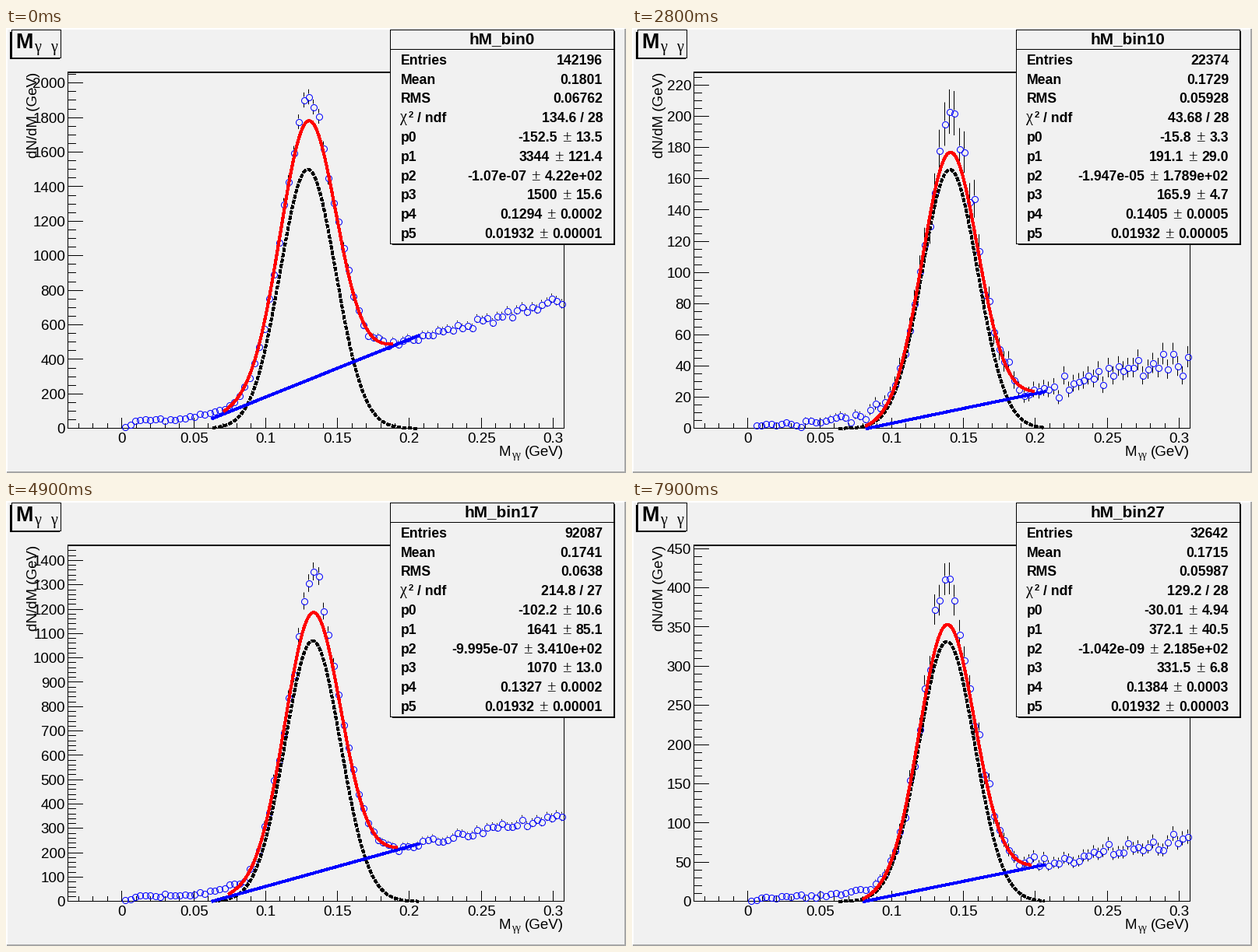
Write a matplotlib script that moves like this. It is 796 px wide and 572 px high and loops after 8000 ms.

```python
import numpy as np
import matplotlib.pyplot as plt
from matplotlib.animation import FuncAnimation
from matplotlib.collections import LineCollection
from matplotlib.patches import Rectangle

W, H, DPI = 796, 572, 100
PX = 72 / DPI
LEFT, RIGHT, TOP, BOTTOM = 79.6, 716.4, 57.2, 514.8
X_MIN, X_MAX = -0.0375, 0.3075
SIGMA = 0.01932
BG = "#f1f1f1"

# Key plots; the ones between are interpolated. p0 and p2 lack their minus sign,
# peak is the highest count and tail the level at x = 0.3.
COLUMNS = "plot entries mean rms chi2 ndf p0 p1 p2 p3 p4 peak tail".split()
KEYS = np.array([
    [0, 142196, .1801, .06762, 134.6, 28, 152.5, 3344, 1.07e-7, 1500, .1294, 1919, 735],
    [6, 116953, .1889, .06922, 110.8, 27, 94.44, 1717, 2.632e-6, 623.5, .13, 840, 450],
    [10, 22374, .1729, .05928, 43.68, 28, 15.8, 191.1, 1.947e-5, 165.9, .1405, 203, 42],
    [14, 63391, .1797, .06425, 116.3, 28, 48.04, 773.6, 1.115e-6, 475.7, .1362, 620, 190],
    [19, 118116, .1703, .0635, 323, 27, 168.5, 2708, 9.225e-7, 1837, .1304, 2281, 515],
    [23, 16626, .1855, .0649, 41.83, 26, 10.21, 79.72, 3.318e-7, 47.21, .1468, 67, 20],
    [27, 32642, .1715, .05987, 129.2, 28, 30.01, 372.1, 1.042e-9, 331.5, .1384, 412, 78],
])
BIN_X = X_MIN + (X_MAX - X_MIN) * (np.arange(100) + 0.5) / 100


def fit_at(k):
    plots = KEYS[:, 0]
    return {name: np.expm1(np.interp(k, plots, np.log1p(col)))
            for name, col in zip(COLUMNS, KEYS.T)}


def background(x, fit):
    return -fit["p0"] + fit["p1"] * x - fit["p2"] * x**2


def bell(x, center, width):
    return np.exp(-0.5 * ((x - center) / width) ** 2)


def gauss(x, fit):
    return fit["p3"] * bell(x, fit["p4"], SIGMA)


def total(x, fit):
    return background(x, fit) + gauss(x, fit)


def histogram(k, fit):
    x, peak, tail = BIN_X, fit["peak"], fit["tail"]
    model = total(x, fit)
    boost = peak / model[x < 0.2].max() - 1
    core = model * (1 + boost * bell(x, fit["p4"], 0.006))
    low = 0.075 * tail * np.clip(x / 0.012, 0, 1) * (1 + (x / 0.068) ** 4)
    high = np.interp(x, [0.195, 0.3, 0.31], [total(0.195, fit), tail, tail])
    mean = np.where(x < fit["p4"], np.maximum(low, core),
                    np.where(x < 0.195, core, high))
    mean = np.maximum(mean, 0)
    noise = np.random.default_rng(100 + k).normal(0, 0.6, 100)
    counts = np.round(np.clip(mean + noise * np.sqrt(mean), 0, peak))
    counts[np.argmax(mean)] = round(peak)
    return np.where(x > 0, counts, 0)


def fit_errors(fit):
    p3 = fit["p3"]
    return [0.6 * fit["p0"]**0.62, 2.1 * fit["p1"]**0.5, 37 * fit["p1"]**0.3,
            0.288 * p3**0.546, 0.0053 * p3**-0.47, 0.00234 * p3**-0.75]


def to_px(x):
    return LEFT + (x - X_MIN) / (X_MAX - X_MIN) * (RIGHT - LEFT)


def pixel(v):
    return np.floor(v) + 0.5


def tick_step(top):
    power = 10 ** np.floor(np.log10(top / 10))
    lead = top / 10 / power
    digit = 1 if lead <= 1.5 else 2 if lead <= 3 else 5 if lead <= 6 else 10
    return digit * power, 4 if digit == 2 else 5


def value_and_error(value, error):
    text = f"{value:.4g}"
    mantissa, exp, _ = text.partition("e")
    places = len(mantissa.partition(".")[2])
    return text, f"{error:.{places}e}" if exp else f"{error:.{places or 1}f}"


fig = plt.figure(figsize=(W / DPI, H / DPI), dpi=DPI, facecolor=BG)
ax = fig.add_axes([0, 0, 1, 1])
ax.set(xlim=(0, W), ylim=(H, 0))
ax.axis("off")


def put(x, y, text="", size=18.8, bold=False, family="Liberation Sans", **kw):
    return ax.text(x, y, text, fontsize=size * PX, family=family, zorder=9,
                   weight="bold" if bold else "normal", **kw)


def box(x0, y0, x1, y1, color, z=1):
    ax.add_patch(Rectangle((x0, y0), x1 - x0, y1 - y0, fc=color, lw=0,
                           antialiased=False, zorder=z))


def pave(x0, y0, x1, y1):
    box(x0, y0, x1, y1, "k", 7)
    box(x0 + 1, y0 + 1, x1 - 1, y1 - 1, BG, 8)


def line(color, width, z, **kw):
    return ax.plot([], [], color=color, lw=width * PX, zorder=z,
                   antialiased=False, **kw)[0]


def segments():
    lines = LineCollection([], colors="k", linewidths=PX, zorder=2)
    lines.set_snap(False)
    return ax.add_collection(lines)


# Canvas bevel and plot frame
box(0, 0, W, 2, "white")
box(0, 0, 2, H, "white")
box(W - 2, 1, W, H, "#a6a6a6")
box(1, H - 2, W, H, "#a6a6a6")
box(79, 56, 717, 58, "k")
box(79, 57, 80, 515, "k")
box(716, 57, 717, 515, "k")
box(79, 514, 717, 515, "k")

# Title
box(5, 5, 69, 40, "k", 6)
pave(7, 2, 71, 39)
put(12, 26, "M", 27, True)
for x in (36, 57):
    put(x, 30, "γ", 20, family="Liberation Serif")

# Axis titles and the fixed x axis
put(35.5, 57, "dN/dM (GeV)", rotation=90, ha="center", va="top")
put(633, 550, "M")
put(649.5, 553, "γγ", 13.5, family="Liberation Serif")
put(716, 550, "(GeV)", ha="right")
x_ticks = []
for n in range(-3, 31):
    x = pixel(to_px(n / 100))
    x_ticks.append([(x, 515), (x, 501 if n % 5 == 0 else 508)])
    if n >= 0 and n % 5 == 0:
        put(x, 533, f"{n / 100:g}", ha="center")
segments().set_segments(x_ticks)

# Statistics box
box(496, 4, 782, 279, "k", 6)
pave(493, 2, 781, 278)
box(494, 27, 780, 28, "k", 8)
STAT = 17.6
heading = put(636.5, 20.5, size=20.8, bold=True, ha="center")
rows = [47 + 24.75 * n for n in range(10)]
for y, name in zip(rows, ["Entries", "Mean", "RMS", "", *(f"p{n}" for n in range(6))]):
    put(506.5, y, name, STAT, True)
put(506.5, rows[3] - 1, "χ", 20, family="Liberation Serif")
put(517, rows[3] - 6, "2", 11.5, True)
put(528.5, rows[3], "/ ndf", STAT, True)
stats = [put(766, y, size=STAT, bold=True, ha="right") for y in rows]


def chain(text, right, y, gap, size, **kw):
    return ax.annotate(text, (0, y), (-gap, 0), xycoords=(right, "data"),
                       textcoords="offset pixels", ha="right", va="baseline",
                       fontsize=size * PX, zorder=9, **kw)


values = []
for y, error in zip(rows[4:], stats[4:]):
    sign = chain("±", error, y, 6, 21, family="Liberation Serif")
    values.append(chain("", sign, y, 6, STAT, family="Liberation Sans", weight="bold"))

# Moving parts
y_ticks, bars = segments(), segments()
y_labels = [put(76, 0, ha="right") for _ in range(18)]
points = line("blue", 1, 3, ls="none", marker="o", ms=8 * PX, mfc="none", mew=PX)
dashed = line("k", 3.3, 4, ls=(0, (1.3, 0.9)))
straight = line("blue", 3, 4)
curve = line("red", 3, 5)


def draw(frame):
    k = (frame + 2) // 3
    fit = fit_at(k)
    counts = histogram(k, fit)
    top = 1.05 * (counts + np.sqrt(counts)).max()

    def y_px(v):
        return BOTTOM - v / top * (BOTTOM - TOP)

    step, parts = tick_step(top)
    ticks = []
    for n in range(int(top / step * parts) + 1):
        y = pixel(y_px(n * step / parts))
        ticks.append([(79, y), (99 if n % parts == 0 else 90, y)])
    y_ticks.set_segments(ticks)
    for n, label in enumerate(y_labels):
        shown = n * step <= top
        label.set_text(f"{n * step:.0f}" if shown else "")
        label.set_y(y_px(n * step) + 6.6 if shown else 0)

    used = counts > 0
    xs, ns = pixel(to_px(BIN_X[used])), counts[used]
    ys, err = pixel(y_px(ns)), np.sqrt(ns) / top * (BOTTOM - TOP)
    points.set_data(xs, ys)
    bars.set_segments([[(x, y + s * 4), (x, y + s * e)]
                       for x, y, e in zip(xs, ys, err) if e > 4 for s in (-1, 1)])

    lo, hi = 0.0632, 0.2062
    wide = np.linspace(lo, hi, 300)
    near = np.linspace(max(lo, fit["p4"] - 3 * SIGMA),
                       min(hi, fit["p4"] + 3 * SIGMA), 300)
    for artist, func, x in ((dashed, gauss, wide), (straight, background, wide),
                            (curve, total, near)):
        v = func(x, fit)
        artist.set_data(to_px(x), y_px(np.where(v < 0, np.nan, v)))

    heading.set_text(f"hM_bin{k}")
    summary = [f"{fit['entries']:.0f}", f"{fit['mean']:.4g}", f"{fit['rms']:.4g}",
               f"{fit['chi2']:.4g} / {fit['ndf']:.0f}"]
    for artist, text in zip(stats, summary):
        artist.set_text(text)
    params = [-fit["p0"], fit["p1"], -fit["p2"], fit["p3"], fit["p4"], SIGMA]
    for value, error, left, right in zip(params, fit_errors(fit), values, stats[4:]):
        text, error_text = value_and_error(value, error)
        left.set_text(text)
        right.set_text(error_text)
    return []


anim = FuncAnimation(fig, draw, frames=80, interval=100, repeat=True, repeat_delay=0)
plt.show()
```
